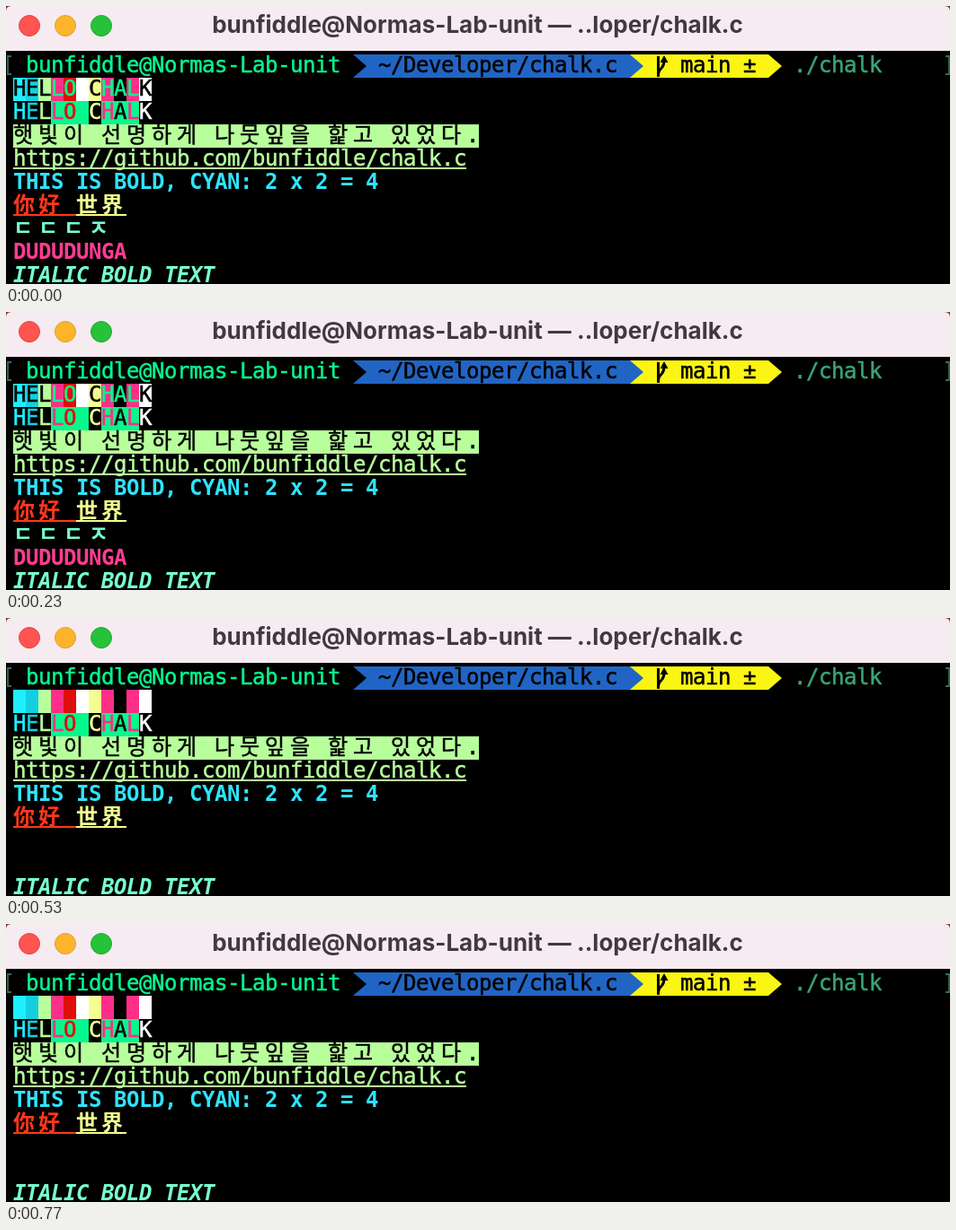
Write an HTML page that moves like this. It is 1050 px wide and 310 px high and loops after 0.81 s.

```html
<!DOCTYPE html>
<html lang="en">
<head>
<meta charset="utf-8">
<title>Terminal colours</title>
<style>
  html, body { margin: 0; width: 100%; height: 100%; overflow: hidden; background: #000; }
  svg { display: block; width: 100vw; height: 100vh; }
  text { white-space: pre; }
  .mono { font: 24px "DejaVu Sans Mono", "Noto Sans CJK KR", "Noto Sans CJK SC", "Noto Sans CJK", monospace; stroke-width: .5px; }
  .bold { font-weight: 700; stroke-width: 0; }
  .italic { font-style: italic; }
  .title { font: 700 26px Inter, sans-serif; fill: #403a3f; }
</style>
</head>
<body>
<svg id="stage" viewBox="0 0 1050 310"></svg>
<script>
const LOOP = 810, BLINK_OFF = 370;
const CELL = 14, ROW = 26, LEFT = 8, TOP = 54;
const BLACK = '#000', WHITE = '#fff', CYAN = '#1feeff', TEAL = '#14cfe0', LIME = '#b8ff9c',
      PINK = '#ff2e88', RED = '#e00d0d', LEMON = '#f2ff90', GREEN = '#06f78d',
      MINT = '#78ffd0', BLUE = '#2165c4', YELLOW = '#fbf514', DIM = '#3a6b55';

const stage = document.getElementById('stage');
const blinking = [];

function add(tag, attrs, content) {
  const node = document.createElementNS('http://www.w3.org/2000/svg', tag);
  for (const key in attrs) node.setAttribute(key, attrs[key]);
  if (content) node.textContent = content;
  stage.append(node);
  return node;
}

const colX = col => LEFT + col * CELL;
const rowY = row => TOP + row * ROW;
const cellsOf = ch => ch.codePointAt(0) > 0x10ff ? 2 : 1;

// Places every character on the terminal grid; East Asian ones take two cells.
function print(row, col, str, fill, style = '') {
  const xs = [];
  for (const ch of str) {
    xs.push(colX(col));
    col += cellsOf(ch);
  }
  return add('text', { class: 'mono ' + style, x: xs.join(' '), y: rowY(row) + 20, fill, stroke: fill }, str);
}

function block(row, col, cells, fill) {
  add('rect', { x: colX(col), y: rowY(row), width: cells * CELL, height: ROW, fill });
}

function underline(row, col, cells, fill) {
  add('rect', { x: colX(col), y: rowY(row) + 22, width: cells * CELL, height: 2, fill });
}

function wedge(col, fill) {
  const x = colX(col), y = rowY(0), tip = CELL + 1;
  add('path', { d: `M${x} ${y}l${tip} ${ROW / 2}l${-tip} ${ROW / 2}z`, fill });
}

function drawWindow() {
  add('rect', { width: 1050, height: 310, fill: BLACK });
  add('rect', { width: 1050, height: 20, fill: '#7b2f4a' });
  add('path', { d: 'M0 50V6Q0 0 6 0H1044Q1050 0 1050 6V50z', fill: '#f6ebf1' });
  [['#ff5450', '#e2443f'], ['#fdb42b', '#dfa023'], ['#25c23a', '#1dab2e']].forEach(([fill, stroke], i) =>
    add('circle', { cx: 26 + 40 * i, cy: 22, r: 11.5, fill, stroke }));
  add('text', { class: 'title', x: 524.5, y: 30, 'text-anchor': 'middle' },
    'bunfiddle@Normas-Lab-unit — ..loper/chalk.c');
}

function drawPrompt() {
  const bracket = { fill: 'none', stroke: DIM, 'stroke-width': 1.8 };
  add('path', { d: 'M6 56H2V76H6', ...bracket });
  add('path', { d: 'M1045 56H1049V76H1045', ...bracket });
  print(0, 1, 'bunfiddle@Normas-Lab-unit', GREEN);
  block(0, 27, 22, BLUE);
  wedge(27, BLACK);
  print(0, 29, '~/Developer/chalk.c', BLACK);
  block(0, 49, 11, YELLOW);
  wedge(49, BLUE);
  add('path', { d: 'M725.5 56V79M725.5 76C725.5 69 732 71 732 61', fill: 'none', stroke: BLACK, 'stroke-width': 3 });
  add('path', { d: 'M727.5 63L732 55L736.5 63z', fill: BLACK });
  print(0, 53, 'main ±', BLACK);
  wedge(60, YELLOW);
  print(0, 62, './chalk', '#3aa577');
}

// The first greeting row is the second one with its colours swapped.
function drawGreeting() {
  const inks = [CYAN, TEAL, LIME, PINK, RED, WHITE, LEMON, PINK, BLACK, PINK, WHITE];
  const papers = [...'00011101110'].map(bit => bit === '1' ? GREEN : BLACK);
  [...'HELLO CHALK'].forEach((ch, i) => {
    block(1, i, 1, inks[i]);
    block(2, i, 1, papers[i]);
    blinking.push(print(1, i, ch, papers[i]));
    print(2, i, ch, inks[i]);
  });
}

function drawOutput() {
  block(3, 0, 37, LIME);
  print(3, 0, '햇빛이 선명하게 나뭇잎을 핥고 있었다.', BLACK);
  print(4, 0, 'https://github.com/bunfiddle/chalk.c', LIME);
  underline(4, 0, 36, LIME);
  print(5, 0, 'THIS IS BOLD, CYAN: 2 x 2 = 4', '#2fe3fb', 'bold');
  print(6, 0, '你好', '#ff371c', 'bold');
  underline(6, 0, 5, '#ff371c');
  print(6, 5, '世界', LEMON, 'bold');
  underline(6, 5, 4, LEMON);
  blinking.push(
    print(7, 0, 'ㄷㄷㄷㅈ', MINT, 'bold'),
    print(8, 0, 'DUDUDUNGA', '#fd3d91', 'bold'));
  print(9, 0, 'ITALIC BOLD TEXT', MINT, 'bold italic');
}

function render(ms) {
  const visibility = ms % LOOP < BLINK_OFF ? 'visible' : 'hidden';
  for (const node of blinking) node.setAttribute('visibility', visibility);
}

drawWindow();
drawPrompt();
drawGreeting();
drawOutput();

const start = performance.now();
function tick() {
  render(performance.now() - start);
  requestAnimationFrame(tick);
}
tick();
</script>
</body>
</html>
```
